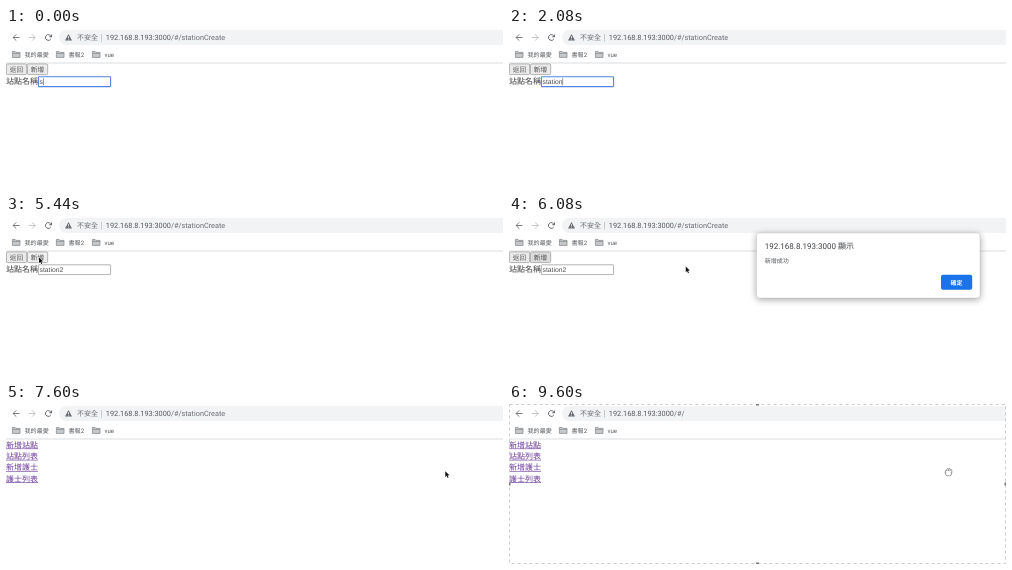
Animation, 497 px wide and 160 px high, one loop 9680 ms. Source, as an HTML page with a canvas:

```html
<!DOCTYPE html>
<html lang="zh-Hant">
<head>
<meta charset="utf-8">
<title>stationCreate</title>
<style>
html, body { margin: 0; width: 100%; height: 100%; overflow: hidden; background: #fff; }
canvas { display: block; width: 497px; height: 160px; }
</style>
</head>
<body>
<canvas id="stage" width="497" height="160"></canvas>
<script>
const LOOP = 9680;
const UI = 'Roboto, "Noto Sans CJK TC", "Noto Sans CJK", sans-serif';
const FORM = '"Liberation Sans", "Noto Sans CJK TC", "Noto Sans CJK", sans-serif';
const CJK = '"Noto Sans CJK TC", "Noto Sans CJK", sans-serif';
const HOST = '192.168.8.193:3000';
const GRAY = '#6a6e73';
const INK = '#55585c';
const KEYS = [0, 640, 960, 1200, 1520, 1760, 2080, 2480];
const CLICK = 5120, ALERT = 5600, CLOSE = 7600, URL_AT = 7680, STOP = 9520;

const canvas = document.getElementById('stage');
const scale = window.devicePixelRatio || 1;
canvas.width = 497 * scale;
canvas.height = 160 * scale;
const c = canvas.getContext('2d');
c.textRendering = 'geometricPrecision';

const clamp = v => Math.max(0, Math.min(1, v));
const ramp = (t, a, b) => clamp((t - a) / (b - a));
const ease = p => p * p * (3 - 2 * p);
const mix = (a, b, p) => a + (b - a) * p;

function text(str, x, y, size, color, font = UI, weight = 400) {
  c.font = `${weight} ${size}px ${font}`;
  c.fillStyle = color;
  c.fillText(str, x, y);
  return x + c.measureText(str).width;
}

function box(x, y, w, h, r, fill, stroke, width = 1) {
  c.beginPath();
  c.roundRect(x, y, w, h, r);
  if (fill) { c.fillStyle = fill; c.fill(); }
  if (stroke) { c.strokeStyle = stroke; c.lineWidth = width; c.stroke(); }
}

function line(points, color, width = 1) {
  c.beginPath();
  points.forEach(([x, y]) => c.lineTo(x, y));
  c.strokeStyle = color;
  c.lineWidth = width;
  c.stroke();
}

function arrow(x, dir, color) {
  line([[x - 3.2 * dir, 9.5], [x + 3.2 * dir, 9.5]], color, 0.9);
  line([[x, 6.3], [x + 3.2 * dir, 9.5], [x, 12.7]], color, 0.9);
}

function reload() {
  c.beginPath();
  c.arc(42.3, 9.5, 2.9, 0.5, 5.5);
  c.strokeStyle = GRAY;
  c.lineWidth = 1;
  c.stroke();
  c.beginPath();
  c.moveTo(46, 6); c.lineTo(46, 9.2); c.lineTo(42.8, 9.2);
  c.fillStyle = GRAY;
  c.fill();
}

function folder(x) {
  c.beginPath();
  c.moveTo(x + 0.4, 23.4); c.lineTo(x + 3, 23.4); c.lineTo(x + 4, 24.4);
  c.lineTo(x + 8, 24.4); c.lineTo(x + 8, 29.4); c.lineTo(x + 0.4, 29.4);
  c.closePath();
  c.fillStyle = '#c6c8ca';
  c.fill();
  c.strokeStyle = '#8b8e92';
  c.lineWidth = 0.8;
  c.stroke();
  line([[x + 0.4, 25.4], [x + 8, 25.4]], '#8b8e92', 0.8);
}

function toolbar(t) {
  arrow(10.3, -1, GRAY);
  arrow(26, 1, '#bbbec1');
  reload();
  box(53, 2, 470, 15, 7.5, '#f1f3f4');

  c.beginPath();
  c.moveTo(62.5, 6); c.lineTo(66, 12.4); c.lineTo(59, 12.4);
  c.fillStyle = GRAY;
  c.fill();
  c.fillStyle = '#f1f3f4';
  c.fillRect(62.1, 8.2, 0.8, 2);
  c.fillRect(62.1, 10.8, 0.8, 0.8);
  text('不安全', 71, 12, 7, GRAY);
  c.fillStyle = '#b5b8bb';
  c.fillRect(95, 6, 0.7, 7.5);
  const end = text(HOST, 99.8, 12, 7.32, INK);
  text(t < URL_AT ? '/#/stationCreate' : '/#/', end, 12, 7.32, GRAY);

  [[6, '我的最愛'], [50, '書報2'], [86, 'vue']].forEach(([x, label]) => {
    folder(x);
    text(label, x + 12.5, 28.7, 6.1, INK);
  });
  c.fillStyle = '#dcdee0';
  c.fillRect(0, 34.5, 497, 1);
}

function button(x, label, fill, ink) {
  box(x + 0.4, 35.9, 20.3, 10.7, 1.3, fill, '#a0a0a0', 0.8);
  text(label, x + 3.8, 43.6, 6.7, ink, FORM);
}

function form(t, hover) {
  const pressed = t >= CLICK && t < ALERT;
  button(0, '返回', '#eaeaea', '#606060');
  button(21, '新增', pressed ? '#efefef' : hover ? '#dcdcdc' : '#ebebeb', '#484848');
  text('站點名稱', 0, 56.1, 8, '#3c3c3c', CJK);

  const focused = t < CLICK;
  if (focused) box(32.4, 48.8, 72.2, 9.8, 0.8, '#fff', '#5482e2', 1.1);
  else box(32.4, 48.8, 72.2, 9.8, 0.5, '#fff', '#a0a0a0', 0.8);

  const count = KEYS.filter(k => k <= t).length;
  const end = text('station2'.slice(0, count), 33.6, 56, 6.75, '#505050', FORM);
  if (focused && (t - KEYS[count - 1]) % 1000 < 500) {
    c.fillStyle = '#505050';
    c.fillRect(end, 50.2, 0.6, 7.2);
  }
}

function links() {
  ['新增站點', '站點列表', '新增護士', '護士列表'].forEach((label, i) => {
    const y = 43.8 + i * 11.3;
    const end = text(label, 0, y, 8, '#6c3a99', CJK);
    c.fillRect(0, y + 0.7, end, 0.6);
  });
}

function dialog() {
  c.save();
  c.shadowColor = 'rgba(0,0,0,0.38)';
  c.shadowBlur = 7 * scale;
  c.shadowOffsetY = 1.5 * scale;
  box(247.5, 17, 223.5, 65, 3, '#fff');
  c.shadowColor = 'transparent';
  box(247.5, 17, 223.5, 65, 3, null, '#c4c6c8', 0.5);
  text(HOST + ' 顯示', 255.7, 33.2, 8, '#3c3f43');
  text('新增成功', 255.7, 47.4, 6, INK);
  box(432, 58.8, 31.2, 15, 2, '#1a73e8');
  text('確定', 441.4, 68.5, 6, '#fff', UI, 700);
  c.restore();
}

function pointer(x, y) {
  c.beginPath();
  [[0, 0], [0, 5.7], [1.3, 4.6], [2.3, 6.8], [3.2, 6.4], [2.3, 4.2], [4.1, 4.1]]
    .forEach(([dx, dy]) => c.lineTo(x + dx, y + dy));
  c.closePath();
  c.lineJoin = 'round';
  c.strokeStyle = '#fff';
  c.lineWidth = 1;
  c.stroke();
  c.fillStyle = '#111';
  c.fill();
  c.lineJoin = 'miter';
}

function beam(x, y) {
  line([[x - 1.3, y - 4], [x, y - 3.5], [x + 1.3, y - 4]], '#333', 0.6);
  line([[x, y - 3.5], [x, y + 3.5]], '#333', 0.7);
  line([[x - 1.3, y + 4], [x, y + 3.5], [x + 1.3, y + 4]], '#333', 0.6);
}

function hand(x, y) {
  [[-2.7, -1.9], [-1.1, -3.3], [0.6, -3.5], [2.2, -2.5]].forEach(([dx, dy]) =>
    box(x + dx - 0.3, y + dy, 1.6, 4, 0.8, '#fff', '#777', 0.7));
  box(x - 2.8, y - 0.6, 6, 4.4, 2, '#fff', '#777', 0.7);
  c.fillStyle = '#fff';
  c.fillRect(x - 2.2, y - 1.1, 4.9, 1.6);
}

function selection() {
  c.setLineDash([3, 3]);
  c.strokeStyle = '#cdcdcd';
  c.lineWidth = 1;
  c.strokeRect(0.5, 0.5, 496, 159);
  c.setLineDash([]);
  c.fillStyle = '#777';
  [[248.5, 0], [248.5, 160], [0, 80], [497, 80]].forEach(([x, y]) =>
    c.fillRect(x - 1.5, y - 1.5, 3, 3));
}

function cursorAt(t) {
  const a = ease(ramp(t, 2800, 3480));
  const b = ease(ramp(t, 5760, 6560));
  return [mix(mix(62, 33, a), 439.3, b), mix(mix(54, 41.3, a), 67.2, b)];
}

function draw(t) {
  c.setTransform(scale, 0, 0, scale, 0, 0);
  c.fillStyle = '#fff';
  c.fillRect(0, 0, 497, 160);
  const [x, y] = cursorAt(t);
  toolbar(t);
  if (t < CLOSE) form(t, t >= 2800 && x < 42 && y < 47 || t >= ALERT);
  else links();
  if (t >= ALERT && t < CLOSE) dialog();

  if (t >= STOP) {
    hand(x, y + 0.8);
    selection();
  } else if (t >= 2800) {
    if (t < 3600 && y > 48) beam(x, y);
    else pointer(x, y);
  }
}

const start = performance.now();
function tick() {
  draw((performance.now() - start) % LOOP);
  requestAnimationFrame(tick);
}
tick();
</script>
</body>
</html>
```
